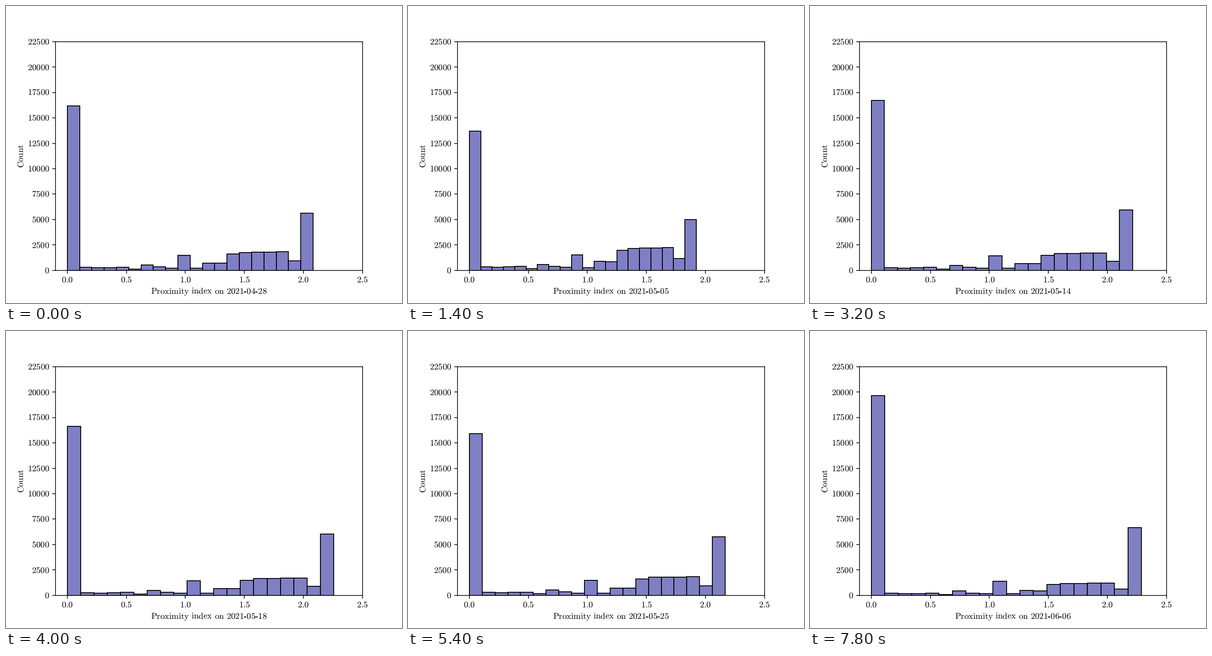
These frames come from a looping animation (864x648 px, 8 s). A matplotlib script:

```python
import matplotlib.pyplot as plt
import numpy as np
from matplotlib.animation import FuncAnimation
from matplotlib.patches import Rectangle
from matplotlib.transforms import IdentityTransform

W, H, DPI = 864, 648, 135
DAYS, STEP_MS, BINS = 40, 200, 20
START = np.datetime64("2021-04-28")
TOTAL = 36900  # every day counts the same population

plt.rcParams["mathtext.fontset"] = "cm"
plt.rcParams["text.hinting"] = "none"

# turning points: day, first bar, last bar, right end of the histogram
TURNS = np.array([
    (0, 16160, 5620, 2.082),
    (7, 13700, 4990, 1.923),
    (12, 15440, 5500, 2.171),
    (18, 17360, 6150, 2.234),
    (20, 16610, 6050, 2.256),
    (27, 15910, 5750, 2.168),
    (33, 17280, 6740, 2.366),
    (36, 19120, 6900, 2.415),
    (39, 19670, 6680, 2.289),
])

# outline of the inner bars: low floor, steep rise, plateau, final dip
OUTLINE = [(1, 300), (2, 240), (4, 320), (5, 145), (7, 330), (8, 230),
           (10, 220), (11, 710), (12, 690), (13, 1600), (14, 1760),
           (17, 1820), (18, 930)]
inner = np.arange(1, BINS - 1)
shape = np.interp(inner, *zip(*OUTLINE))
shape /= shape.sum()
bumps = np.where(inner == 6, 280, 0) + np.where(inner == 9, 1240, 0)


def state(day):
    """Bar heights and bar width; inner bars share what the outer two leave."""
    first, last, end = (np.interp(day, TURNS[:, 0], col)
                        for col in TURNS.T[1:])
    rest = TOTAL - first - last - bumps.sum()
    return [first, *(shape * rest + bumps), last], end / BINS


def roman(text):
    return r"$\mathrm{%s}$" % text


def date_text(day):
    # gaps as wide as a hyphen; the dashes themselves are drawn once
    parts = str(START + day).split("-")
    return "$" + r"\hspace{0.3796}".join(r"\mathrm{%s}" % p for p in parts) + "$"


fig = plt.figure(figsize=(W / DPI, H / DPI), dpi=DPI, facecolor="white")
ax = fig.add_axes([0.125, 0.11, 0.775, 0.77])
xticks = np.arange(0, 2.6, 0.5)
yticks = np.arange(0, 22501, 2500)
ax.set_xticks(xticks, [""] * len(xticks))
ax.set_yticks(yticks, [""] * len(yticks))

heights, width = state(0)
bars = ax.bar(range(BINS), heights, align="edge", linewidth=1,
              facecolor=(0, 0, 139 / 255, 0.5), edgecolor="black")
ax.set_xlim(-0.1, 2.5)
ax.set_ylim(0, 22500)


def put(x, y, text, ha="left", **kw):
    """Place text with its baseline at pixel (x, y), measured from the top."""
    return fig.text(x, H - y, text, ha=ha, va="baseline", fontsize=10,
                    transform=IdentityTransform(), **kw)


for v in xticks:
    px = ax.transData.transform((v, 0))[0]
    put(px, 603, roman(f"{v:.1f}"), ha="center")
for v in yticks:
    py = H - ax.transData.transform((0, v))[1]
    put(95, py + 6, roman(v), ha="right")

put(38.7, 327.2, roman("Count"), ha="center", rotation=90,
    rotation_mode="anchor")
for x, word in [(316, "Proximity"), (404, "index"), (455, "on")]:
    put(x, 628, roman(word))
date = put(481, 628, date_text(0))
for x in (518.7, 543.7):
    fig.add_artist(Rectangle((x, H - 628 + 3.5), 5, 1.1, color="black", lw=0,
                             transform=IdentityTransform()))


def draw(day):
    heights, width = state(day)
    for i, (bar, n) in enumerate(zip(bars, heights)):
        bar.set_bounds(i * width, 0, width, n)
    date.set_text(date_text(day))
    return [*bars, date]


anim = FuncAnimation(fig, draw, frames=DAYS, interval=STEP_MS, repeat=True,
                     repeat_delay=0, blit=False)
plt.show()
```
